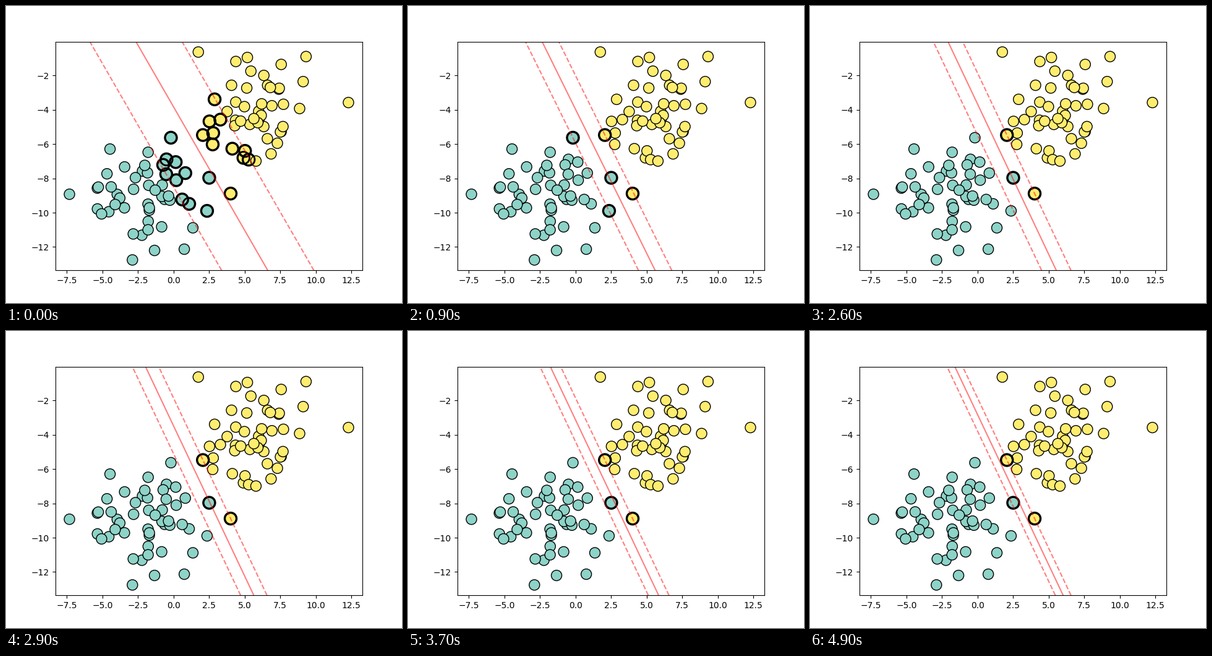
Recreate the animation shown at these times as a matplotlib script. Size 640 by 480 pixels, loop 5 s.

```python
import numpy as np
import matplotlib.pyplot as plt
from matplotlib.animation import FuncAnimation

FRAMES, INTERVAL = 50, 100
C_START, C_STEP = 0.01, 0.05


def make_blobs(count, spread, seed):
    """Two shuffled Gaussian clusters around random centres."""
    rng = np.random.RandomState(seed)
    centers = rng.uniform(-10, 10, size=(2, 2))
    half = count // 2
    points = np.vstack([rng.normal(center, spread, size=(half, 2))
                        for center in centers])
    order = np.arange(count)
    rng.shuffle(order)
    return points[order], np.repeat([-1.0, 1.0], half)[order]


points, labels = make_blobs(100, 1.9, seed=40)
kernel = points @ points.T
diagonal = np.diag(kernel)


def train(c, tol=1e-4, eps=1e-12):
    """Linear soft-margin SVM by sequential minimal optimisation."""
    alpha = np.zeros(len(labels))
    grad = -np.ones(len(labels))
    positive = labels > 0
    for _ in range(5000):
        score = -labels * grad
        below, above = alpha < c - eps, alpha > eps
        up = np.where(positive, below, above)
        low = np.where(positive, above, below)
        i = np.argmax(np.where(up, score, -np.inf))
        gap = score[i] - score
        if gap[low].max() < tol:
            break
        curve = np.maximum(diagonal[i] + diagonal - 2 * kernel[i], eps)
        j = np.argmax(np.where(low & (gap > 0), gap ** 2 / curve, -1))
        room_i = c - alpha[i] if positive[i] else alpha[i]
        room_j = alpha[j] if positive[j] else c - alpha[j]
        step = min(gap[j] / curve[j], room_i, room_j)
        alpha[i] += labels[i] * step
        alpha[j] -= labels[j] * step
        grad += step * labels * (kernel[i] - kernel[j])
    weights = (alpha * labels) @ points
    bias = (score[up].max() + score[low].min()) / 2
    return weights, bias, alpha > 1e-8


models = [train(C_START + C_STEP * k) for k in range(FRAMES)]

fig, ax = plt.subplots(figsize=(6.4, 4.8), dpi=100)
ax.scatter(*points.T, c=labels, cmap="Set3", s=150, edgecolors="k",
           linewidths=1)
xlim, ylim = ax.get_xlim(), ax.get_ylim()
ax.set(xlim=xlim, ylim=ylim)
grid_y, grid_x = np.meshgrid(np.linspace(*ylim, 30), np.linspace(*xlim, 30))
drawn = []


def update(frame):
    while drawn:
        drawn.pop().remove()
    weights, bias, support = models[frame]
    drawn.append(ax.scatter(*points[support].T, s=200, facecolors="none",
                            edgecolors="k", linewidths=2))
    decision = weights[0] * grid_x + weights[1] * grid_y + bias
    drawn.append(ax.contour(grid_x, grid_y, decision, levels=[-1, 0, 1],
                            colors="r", alpha=0.5,
                            linestyles=["--", "-", "--"]))
    return drawn


anim = FuncAnimation(fig, update, frames=FRAMES, interval=INTERVAL,
                     repeat=True, repeat_delay=0)
plt.show()
```
